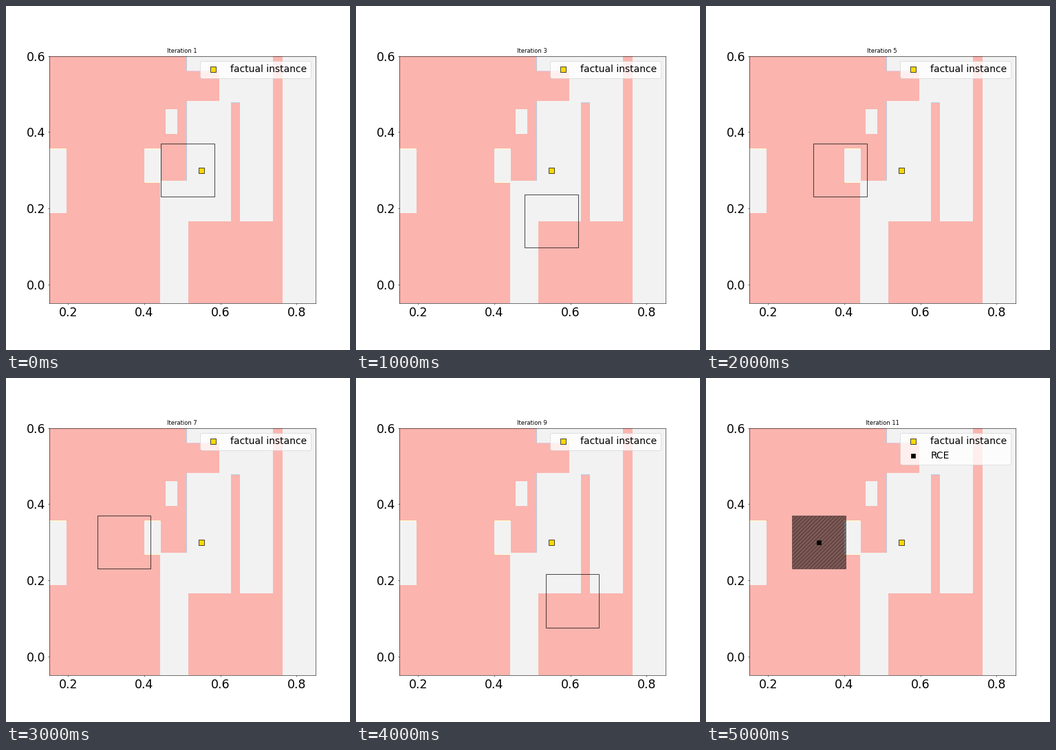
Write a matplotlib script that moves like this. It is 500 by 500 pixels and loops after 5.5 s.

```python
import matplotlib.pyplot as plt
import numpy as np
from matplotlib.animation import FuncAnimation
from matplotlib.patches import Rectangle

HALF = 0.07                  # half side of the uncertainty box
FX, FY = 0.55, 0.3           # factual instance
WALL, SPLIT, FLOOR, SEAM = 0.4425, 0.5125, 0.1665, 0.2715


def within(v, low, high):
    return (v > low) & (v < high)


def classify(x, y):
    """Decision tree: 1 where the desired class is not predicted."""
    bottom = within(x, WALL, 0.5145)
    holes = ((x < 0.1955) & within(y, 0.1885, 0.3555)
             | within(x, 0.4015, WALL) & within(y, 0.2685, 0.3555)
             | within(x, 0.4575, 0.4865) & within(y, 0.3955, 0.4595)
             | (x > WALL) & (y < SEAM))
    bar = within(x, 0.6265, 0.6515) & (y < 0.4785)
    block = (x < 0.5975) & within(y, 0.4805, 0.5615)
    upper = np.where(x < SPLIT, holes, ~bar & ~block)
    inner = np.where(y < FLOOR, bottom, upper)
    return np.where(x > 0.7375, x > 0.7645, inner).astype(float)


def candidates():
    """Box centres, searched outward from the factual instance."""
    slide = [(FX - 0.161 - 0.021 * k, FY) for k in range(3)]
    return [(SPLIT + 0.0015, FY), (0.458, SEAM + HALF), (FX, FLOOR),
            (0.625, FLOOR + 0.7 * HALF), *slide,
            (0.569, 0.11), (0.605, 0.1455), (0.374, 0.2645), (0.333, FY)]


def box(**style):
    return ax.add_patch(Rectangle((0, 0), 2 * HALF, 2 * HALF, zorder=3, **style))


def square(x, y, size, color, label):
    return ax.scatter(x, y, s=size ** 2, marker="s", c=color, edgecolors="black",
                      linewidths=1, zorder=4, label=label)


fig, ax = plt.subplots(figsize=(10, 10), dpi=50)
gx, gy = np.meshgrid(np.arange(150, 851) / 1000, np.arange(-50, 601) / 1000)
ax.contourf(gx, gy, classify(gx, gy), cmap="Pastel1")
ax.set(xlim=(0.15, 0.85), ylim=(-0.05, 0.6), aspect="equal",
       xticks=[0.2, 0.4, 0.6, 0.8], yticks=[0, 0.2, 0.4, 0.6])
ax.tick_params(labelsize=25)

centres = candidates()
factual = square(FX, FY, 12, "gold", "factual instance")
solution = square(*centres[-1], 8, "black", "RCE")
outline = box(fill=False, ec="black", lw=1)
shaded = box(fc="black", ec="black", alpha=0.5, hatch="///")


def update(i):
    x, y = centres[i]
    solved = i == len(centres) - 1
    for patch in (outline, shaded):
        patch.set_xy((x - HALF, y - HALF))
    outline.set_visible(not solved)
    shaded.set_visible(solved)
    solution.set_visible(solved)
    ax.set_title(f"Iteration {i + 1}", fontsize=12)
    ax.legend(handles=[factual, solution] if solved else [factual],
              loc="upper right", fontsize=20)
    return []


anim = FuncAnimation(fig, update, frames=len(centres), init_func=lambda: update(0),
                     interval=500, repeat=True, repeat_delay=0)
plt.show()
```
